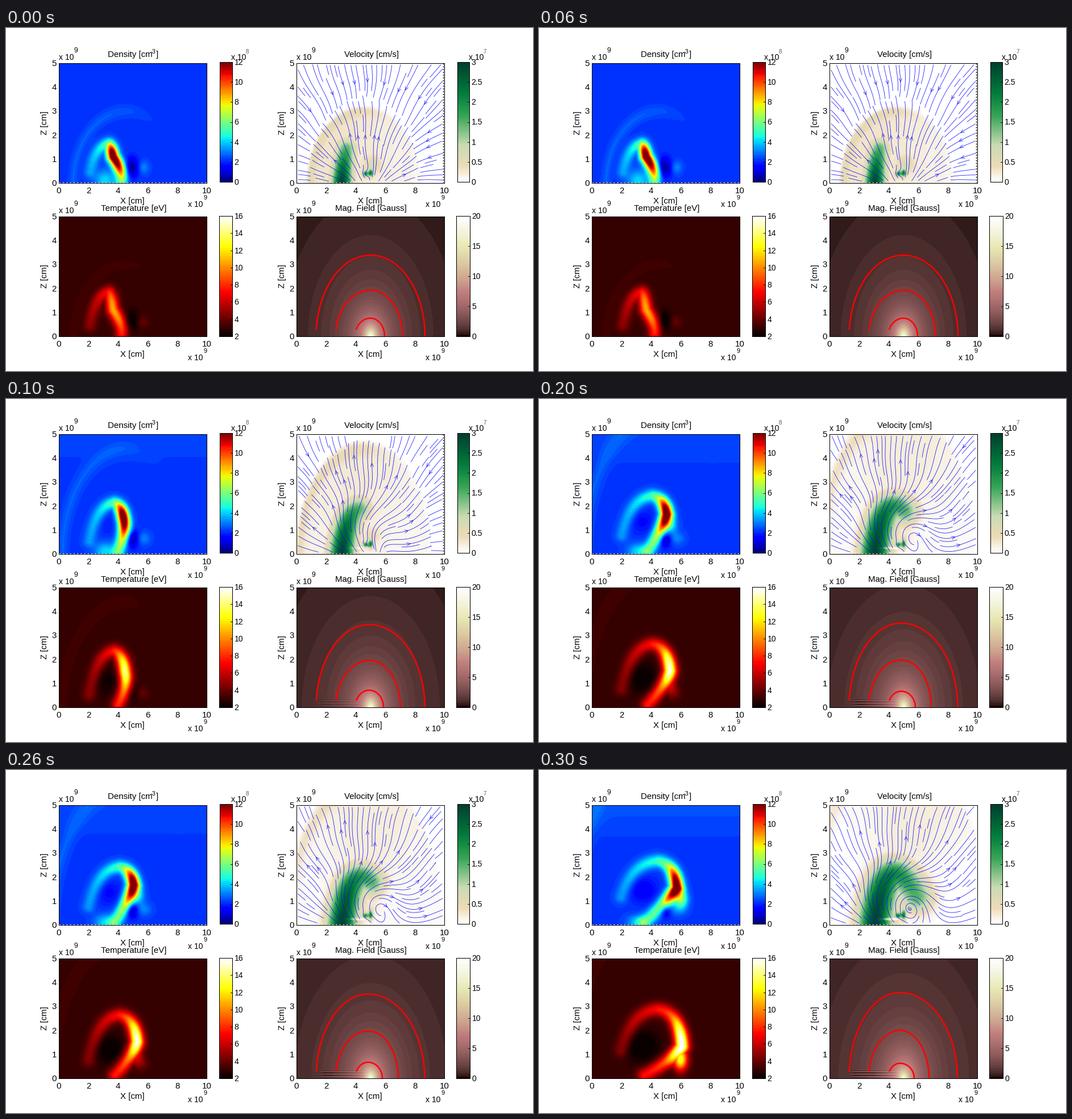
Write a matplotlib script that moves like this. It is 927 by 604 pixels and loops after 400 ms.

```python
import math
import random

import numpy as np
import matplotlib.pyplot as plt
from matplotlib.animation import FuncAnimation
from matplotlib.collections import LineCollection
from matplotlib.colors import LinearSegmentedColormap

W, H, DPI = 927, 604, 100
STEPS = 4
PW, PH = 260, 211
plt.rcParams["font.family"] = "Liberation Sans"
fig = plt.figure(figsize=(W / DPI, H / DPI), dpi=DPI, facecolor="white")

GREENS = LinearSegmentedColormap.from_list("greens", [
    (0, "#ffffff"), (.13, "#eddbb6"), (.3, "#c9dcb4"),
    (.55, "#36a556"), (.75, "#007a3c"), (1, "#00402e")], N=64)
JET, HOT, PINK = (plt.get_cmap(n, 64) for n in ("jet", "hot", "pink"))


# ---- layout, all in stage pixels with y down ----
def label(x, y, s, size=15, ha="center", **kw):
    fig.text(x / W, 1 - y / H, s, fontsize=size * 72 / DPI, ha=ha,
             va=kw.pop("va", "baseline"), **kw)


def axes(x0, y0, x1, y1):
    ax = fig.add_axes([x0 / W, 1 - y1 / H, (x1 - x0) / W, (y1 - y0) / H])
    ax.set(xlim=(x0, x1), ylim=(y1, y0), xticks=[], yticks=[])
    for s in ax.spines.values():
        s.set_linewidth(.75)
    return ax


def panel(x0, y0, cmap, lo, hi):
    x1, y1 = x0 + PW, y0 + PH
    ax = axes(x0, y0, x1, y1)
    im = ax.imshow(np.zeros((PH, PW)), cmap=cmap, vmin=lo, vmax=hi,
                   extent=(x0, x1, y1, y0), aspect="auto", interpolation="bilinear")
    for i in range(6):
        label(x0 + 52 * i, y1 + 18, str(2 * i))
        label(x0 - 4, y1 + 5 - PH / 5 * i, str(i), ha="right")
    label(x0 + 129, y1 + 35.5, "X [cm]")
    label(x0 - 25, y0 + 105, "Z [cm]", rotation=90, va="center")
    label(x0, y0 - 6, "x 10", 14, "left")
    label(x0 + 30, y0 - 19, "9", 12)
    label(x0 + 227, y1 + 42, "x 10", 14, "left")
    label(x0 + 258, y1 + 29, "9", 11)
    return ax, im


def colorbar(x0, y0, x1, y1, cmap, ticks, power=None):
    ax = axes(x0, y0, x1, y1)
    ax.imshow(np.arange(64)[::-1, None], cmap=cmap, extent=(x0, x1, y1, y0),
              aspect="auto", interpolation="nearest")
    for i, t in enumerate(ticks):
        y = y1 - (y1 - y0) * i / (len(ticks) - 1)
        ax.plot([x1 - 3, x1], [y, y], color="black", lw=.7)
        label(x1 + 3.5, y + 5, f"{t:g}", 14, "left")
    if power:
        label(x0 + 20, y0 - 4, "x 10", 14, "left")
        label(x0 + 48, y0 - 15, power, 10, color="#606060")


dens_ax, dens_im = panel(93, 62, JET, 0, 12)
velo_ax, velo_im = panel(511, 62, GREENS, 0, 3)
temp_ax, temp_im = panel(93, 332, HOT, 2, 16)
magn_ax, magn_im = panel(511, 332, PINK, 0, 20)
colorbar(376, 60, 398, 271, JET, range(0, 13, 2), "8")
colorbar(794, 60, 815, 271, GREENS, np.arange(0, 3.1, .5), "7")
colorbar(375, 331, 398, 543, HOT, range(2, 17, 2))
colorbar(792, 331, 816, 543, PINK, range(0, 21, 5))

label(179, 51, "Density [cm", ha="left")
label(254, 45, "-3", 11, "left")
label(264, 51, "]", ha="left")
label(643, 51, "Velocity [cm/s]")
label(225, 322, "Temperature [eV]")
label(642, 322, "Mag. Field [Gauss]")

for ax, x0 in ((dens_ax, 93), (velo_ax, 511)):
    ax.plot([x0, x0 + PW], [272, 272], color="white", lw=.9, ls=(0, (2, 3)))


# ---- shapes ----
def grid(x0, y0):
    y, x = np.mgrid[0:PH, 0:PW]
    return x + x0, y + y0


def blob(g, x, y, sx, sy, amp):
    return amp * np.exp(-((g[0] - x) / sx) ** 2 - ((g[1] - y) / sy) ** 2)


def bezier(a, c, b, n=24):
    t = np.linspace(0, 1, n)[:, None]
    a, c, b = map(np.array, (a, c, b))
    return (1 - t) ** 2 * a + 2 * t * (1 - t) * c + t ** 2 * b


def ridge(g, w, path, amps):
    """Soft tube along a path."""
    out = np.zeros((PH, PW))
    for (x, y), a in zip(path, amps):
        out = np.maximum(out, blob(g, x, y, w, w, a))
    return out


def ramp(v):
    return 1 / (1 + np.exp(-np.clip(v, -40, 40)))


def loop(p, lift=0):
    """Path of the rising plasma loop: foot, apex, head, tail; also the head."""
    fx, fy = 147 - 3 * p, 253 - 30 * p * p
    ax, ay = 181 + 27 * p, 204 - 44 * p ** .65 - lift
    hx, hy = 188 + 54 * p + lift * p, 226 - 70 * p + 51 * p * p + lift * p
    tail = 203 - 18 * p, 267
    path = np.vstack([
        bezier((fx, fy), (fx + .3 * (ax - fx), ay + 3), (ax, ay)),
        bezier((ax, ay), (hx - 4, ay + 4), (hx, hy)),
        bezier((hx, hy), (hx + 16 - 32 * p, hy + 24), tail)])
    return path, (hx, hy)


def strength(p, limb, peak):
    t = np.linspace(0, 3, 72)
    base = limb * np.clip(.42 + .55 * t, 0, 1)
    return base + (peak - limb) * np.exp(-((t - 2) / (.75 - .25 * p)) ** 2)


def front(g, k, cx):
    """Scaled distance from the foot of the expanding blast front."""
    return np.hypot((g[0] - cx) / (100 + 20 * k), (g[1] - 272) / (134 + 63 * k))


def wave(g, k, cx):
    s = front(g, k, cx)
    return np.exp(-((s - .94) / .07) ** 2) * ramp((cx + 15 - g[0]) / 14)


# ---- scalar fields ----
def density(k):
    p, g = k / (STEPS - 1), grid(93, 62)
    path, (hx, hy) = loop(p)
    d = ridge(g, 10 + p, path, strength(p, 2.8, 11.5))
    d += .45 * wave(g, k, 212)
    d += blob(g, 174, 268, 18, 18 - 6 * p, 1.9)
    d += blob(g, hx + 8, hy + 20, 11, 15, 4 * p * p)
    d += blob(g, 221, 245, 11, 17 - 4 * p, -1.9)
    d += blob(g, 242, 245, 9 + 6 * p, 11, .9)
    d += blob(g, 178 + 5 * p, 225 - 14 * p, 24, 22, -.9 * p)
    d += .25 * p * ramp((105 - g[1]) / 8)
    return np.clip(d + 2.2, .2, 12)


def temperature(k):
    p, g = k / (STEPS - 1), grid(93, 62)
    path, (hx, hy) = loop(p, 9)
    t = ridge(g, 11 + p, path, strength(p, 4.3, 7.7 + 6 * p ** .4))
    t = np.maximum(t, blob(g, hx - 2, hy + 22, 12, 20, 10 * p * p))
    t += .25 * wave(g, k, 212)
    t += blob(g, 221, 245, 11, 18, -1.3 + .9 * p)
    t += blob(g, 240, 247, 10, 10, .9)
    t += blob(g, 177 + 5 * p, 230 - 14 * p, 28, 27, -1.5 * p ** .5)
    return np.clip(t + 3, 2, 16)


def speed(k):
    p, g = k / (STEPS - 1), grid(511, 62)
    x, y = g
    s = front(g, k, 629)
    lean = np.arctan2(x - 600, 273 - y)
    fan = 1 - p * (1 - np.exp(-((lean - .3) / .5) ** 2))
    fade = np.clip(1.15 - (x - 570) / 210, .15, 1)
    v = ramp((1 - s) / .015) * (.3 * fan * (fade * (1 - p) + .75 * p) + .25 * wave(g, k, 629))
    tip = 598 + 66 * p, 212 - 90 * p + 100 * p * p
    jet = bezier((590, 275), (592 + 15 * p, 240 - 115 * p), tip, 50)
    v = np.maximum(v, ridge(g, 17 + 11 * p, jet, np.linspace(3, 1.5, 50)))
    v += blob(g, 645, 240, 12, 12, .5 * (1 - p))
    v += blob(g, 632, 256, 5, 5, 1.7) + blob(g, 641, 255, 4, 6 + k, 1.9)
    v -= blob(g, 618, 262, 16, 2, 1.2 * p)
    return np.clip(v, 0, 3)


def field(k):
    x, y = grid(511, 332)
    r = np.hypot((x - 641) / 26, (543 - y) / 42)
    b = 20 / (1 + (r / .42) ** (1.3 - .05 * k))
    box = ramp((x - 553) / 5) * ramp((626 - x) / 4) * np.exp(-((y - 535) / 6) ** 2)
    return np.maximum(b + k * box * np.cos((y - 535) * 1.5), .3)


# ---- flow lines ----
def swirl(x, y, cx, cy, r, amp):
    """Clockwise eddy on the stage."""
    dx, dy = x - cx, y - cy
    a = amp * math.exp(-(dx * dx + dy * dy) / r ** 2) / r
    return -dy * a, dx * a


def flow(k, x, y):
    """Unit vector: outward within the front, inward beyond it."""
    p = k / (STEPS - 1)
    outside = math.hypot((x - 630) / (97 + 22 * k), (y - 272) / (151 + 46 * k)) > 1
    sx, sy = (630, 275) if outside else (640 - 5 * k, 298)
    dx, dy = x - sx, y - sy
    r = math.hypot(dx, dy) * (-1 if outside else 1) + 1e-6
    u, v = dx / r + .12 * math.sin(y / 17 + x / 40), dy / r + .1 * math.sin(x / 21)
    for e in ((642, 240, 50, 4.5 * p), (632, 257, 8, 2)):
        a, b = swirl(x, y, *e)
        u, v = u + a, v + b
    n = math.hypot(u, v) + 1e-9
    return u / n, v / n


def cell(x, y):
    return int(x // 8), int(y // 8)


def trace(k, x, y, sign, used):
    pts, last, own, here = [], None, set(), cell(x, y)
    for _ in range(120):
        u, v = flow(k, x, y)
        u, v = flow(k, x + sign * u, y + sign * v)
        if last and u * last[0] + v * last[1] < .2:
            break
        last = u, v
        x, y = x + 2 * sign * u, y + 2 * sign * v
        c = cell(x, y)
        if not (513 < x < 769 and 64 < y < 270) or c in used:
            break
        if c != here:
            if c in own:
                break
            own.add(here)
            here = c
        pts.append((x, y))
    return pts


def arrow(a, b, size=7):
    t = math.atan2(b[1] - a[1], b[0] - a[0])
    wing = [(b[0] - size * math.cos(t + d), b[1] - size * math.sin(t + d)) for d in (-.4, .4)]
    return [wing[0], b, wing[1]]


def streams(k):
    rng = random.Random(11 + k)
    seeds = [(x, y) for x in range(516, 769, 8) for y in range(67, 270, 8)]
    rng.shuffle(seeds)
    used, lines = set(), []
    for x, y in seeds:
        if cell(x, y) in used:
            continue
        line = trace(k, x, y, -1, used)[::-1] + [(x, y)] + trace(k, x, y, 1, used)
        if len(line) < 10:
            continue
        used.update(cell(*q) for q in line)
        lines.append(line)
        if len(line) > 24 and rng.random() < .45:
            i = int(len(line) * .55)
            lines.append(arrow(line[i - 1], line[i]))
    return LineCollection(lines, colors="#1010ff", linewidths=.55, visible=False)


flows = [streams(k) for k in range(STEPS)]
for c in flows:
    velo_ax.add_collection(c)
rim, = velo_ax.plot([769, 769], [62, 272], color="black", lw=1, ls=(0, (1.5, 2)))

# ---- red field lines: left foot, top, right foot, drift of top and right foot ----
ARCHES = [(545.5, 400, 737, -2.7, -.3),
          (580, 461.5, 697.5, -1, -3.8),
          (614, 511, 666, 1.8, -2)]
reds = [magn_ax.plot([], [], color="red", lw=1.8)[0] for _ in ARCHES]


def arch(k, left, top, right, rise, slide):
    cx, h = 641 - 2 * k, 543 - top - rise * k
    a = np.linspace(math.pi - math.asin(13 / h), 0, 90)
    c = np.cos(a)
    return cx + np.where(c < 0, cx - left, right + slide * k - cx) * c, 543 - h * np.sin(a)


data = [(density(k), speed(k), temperature(k), field(k)) for k in range(STEPS)]
images = dens_im, velo_im, temp_im, magn_im


def draw(k):
    for im, d in zip(images, data[k]):
        im.set_data(d)
    for i, c in enumerate(flows):
        c.set_visible(i == k)
    for ln, spec in zip(reds, ARCHES):
        ln.set_data(*arch(k, *spec))
    rim.set_visible(k < 2)
    return [*images, *flows, *reds, rim]


anim = FuncAnimation(fig, draw, frames=STEPS, interval=100, repeat=True,
                     repeat_delay=0, init_func=lambda: draw(0), blit=False)
plt.show()
```
